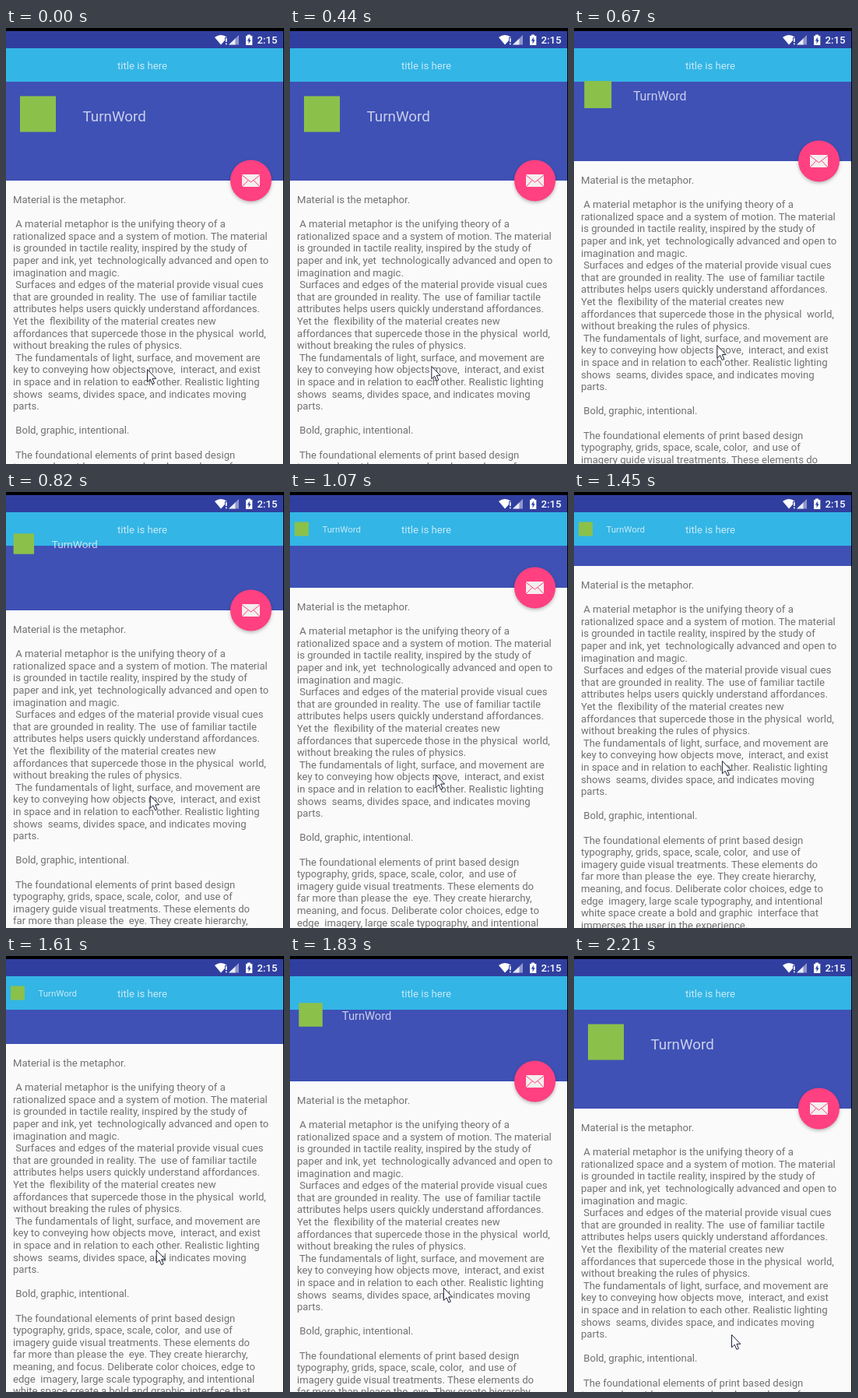
Animation of 357x560 px, one loop 2290 ms. Source, as an HTML page:

```html
<!DOCTYPE html>
<html lang="en">
<head>
<meta charset="utf-8">
<title>Collapsing header</title>
<style>
  html, body { margin: 0; width: 100%; height: 100%; overflow: hidden; background: #fafafa; }
  svg { display: block; width: 357px; height: 560px; }
  text { font: 13.13px Roboto, sans-serif; white-space: pre; }
  #body { fill: #717171; }
  .soft { fill: #fff; fill-opacity: .72; }
  #fab circle { filter: drop-shadow(0 2px 2px rgba(0, 0, 0, .25)); }
</style>
</head>
<body>
<svg viewBox="0 0 357 560">
  <rect width="357" height="560" fill="#fafafa"/>
  <g id="body"></g>
  <rect id="header" y="69" width="357" fill="#3f51b5"/>
  <rect y="26" width="357" height="43" fill="#33b5e5"/>
  <text class="soft" x="175" y="53" text-anchor="middle">title is here</text>
  <rect id="icon" fill="#8bc14a"/>
  <text id="name" class="soft">TurnWord</text>

  <g id="fab">
    <circle r="26.5" fill="#ff4081"/>
    <rect x="-11.5" y="-8" width="23" height="16" rx="1" fill="#f3eeee"/>
    <path d="M-11.5-7 0 2 11.5-7M-11.5 8-3.5-.5M11.5 8 3.5-.5" fill="none" stroke="#ff4081"/>
  </g>

  <rect y="4" width="357" height="22" fill="#303f9f"/>
  <g fill="#fff">
    <path d="M268 12Q276 6 284 12H281V16L276 21.5Z"/>
    <path d="M282 13h1.6v5h-1.6zM282 19.5h1.6v1.8h-1.6z"/>
    <path d="M299 9V21.5H286Z" opacity=".45"/>
    <path d="M294.5 13.5V21.5H286Z" opacity=".8"/>
    <path d="M308 10h2V8.5h4V10h2.3V22H308Z"/>
    <path d="M312.8 11.5 309.8 16.5H311.6V20.5L314.6 15.2H312.8Z" fill="#303f9f"/>
    <text x="322.5" y="20.3" style="font-weight:500">2:15</text>
  </g>
  <rect width="357" height="4"/>
  <rect x="356" width="1" height="560"/>
  <path id="cursor" d="M0 0V16.2L3.8 12.7 6.4 18.8 9 17.7 6.4 11.8H11.3Z" fill="#fff" stroke="#1c2238"/>
</svg>

<script>
const LOOP = 2290, REST = 435, STEP = 77;

const LINES = `Material is the metaphor.

 A material metaphor is the unifying theory of a
rationalized space and a system of motion. The material
is grounded in tactile reality, inspired by the study of
paper and ink, yet  technologically advanced and open to
imagination and magic.
 Surfaces and edges of the material provide visual cues
that are grounded in reality. The  use of familiar tactile
attributes helps users quickly understand affordances.
Yet the  flexibility of the material creates new
affordances that supercede those in the physical  world,
without breaking the rules of physics.
 The fundamentals of light, surface, and movement are
key to conveying how objects move,  interact, and exist
in space and in relation to each other. Realistic lighting
shows  seams, divides space, and indicates moving
parts.

 Bold, graphic, intentional.

 The foundational elements of print based design
typography, grids, space, scale, color,  and use of
imagery guide visual treatments. These elements do
far more than please the  eye. They create hierarchy,
meaning, and focus. Deliberate color choices, edge to
edge  imagery, large scale typography, and intentional
white space create a bold and graphic  interface that
immerses the user in the experience.`.split("\n");

const $ = id => document.getElementById(id);
const set = (id, attrs) => {
  for (const k in attrs) $(id).setAttribute(k, attrs[k]);
};
const clamp = v => Math.max(0, Math.min(1, v));
const mix = (a, b, p) => a + (b - a) * p;
const glide = (t, from, to) => clamp((t - from) / (to - from));

// The screen rests, then refreshes at a steady rate.
const hold = t => t < REST ? 0 : REST + STEP * Math.floor((t - REST) / STEP);

function draw(t) {
  // The pointer drags the page up and back; the header follows with some slack.
  const up = glide(t, 400, 1300), down = glide(t, 1383, 2109);
  const folded = glide(t, 467, 1277) - glide(t, 1503, 1989);
  const hidden = glide(t, 1155, 1355) - glide(t, 1595, 1795);

  const h = Math.round(mix(196, 95, folded));
  const open = clamp((h - 133) / 63);
  const size = mix(18, 46, open);
  const scale = 1 - hidden ** 3;

  set("body", { transform: `translate(9 ${h + 29})` });
  set("header", { height: h - 69 });
  set("icon", {
    x: mix(6, 18, open), y: mix(47.5, 110.5, open) - size / 2, width: size, height: size
  });
  set("name", { x: mix(41.5, 98.5, open), y: mix(52, 119.5, open) });
  $("name").style.fontSize = mix(11.4, 18.8, open) + "px";
  set("fab", { transform: `translate(314.5 ${h}) scale(${scale})`, opacity: scale });
  set("cursor", {
    transform: `translate(${181.5 + 8 * up + 13 * down} ${438.5 - 104 * up + 152 * down})`
  });
}

LINES.forEach((line, i) => {
  const el = document.createElementNS("http://www.w3.org/2000/svg", "text");
  el.textContent = line;
  el.setAttribute("y", i * 15.6);
  $("body").append(el);
});

const start = performance.now();
function tick() {
  draw(hold((performance.now() - start) % LOOP));
  requestAnimationFrame(tick);
}
tick();
</script>
</body>
</html>
```
